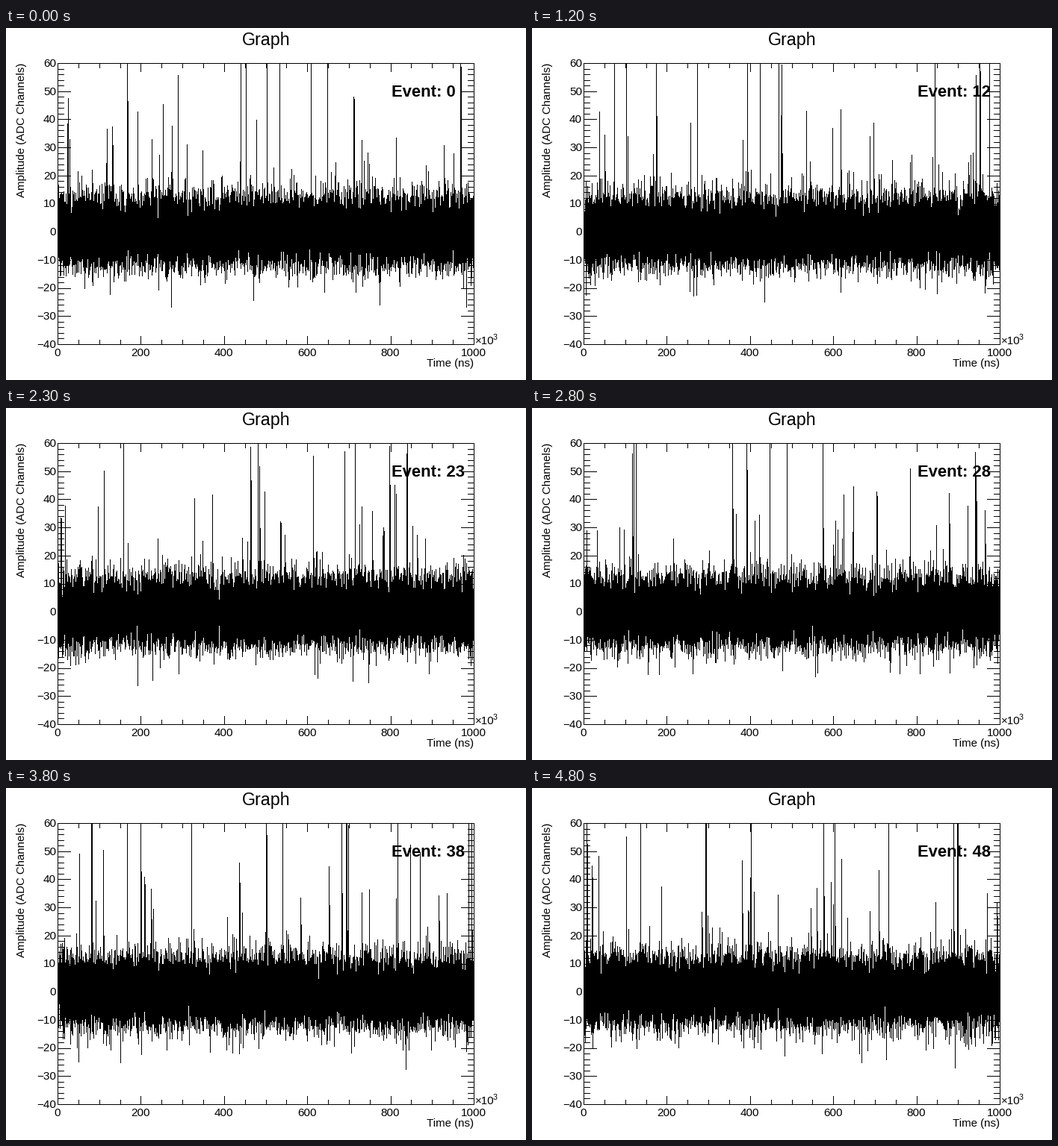
These frames come from a looping animation (696x472 px, 4900 ms). A matplotlib script:

```python
import numpy as np
import matplotlib.pyplot as plt
from matplotlib.animation import FuncAnimation
from matplotlib.collections import LineCollection

W, H, DPI = 696, 472, 100
LEFT, RIGHT, TOP, BOTTOM = 69, 626, 47, 424
EVENTS = 49
PX = 72 / DPI  # one pixel in points
COLS = np.arange(LEFT + 1, RIGHT)

plt.rcParams["font.family"] = "Liberation Sans"
fig = plt.figure(figsize=(W / DPI, H / DPI), dpi=DPI, facecolor="white")
ax = fig.add_axes([0, 0, 1, 1])
ax.set(xlim=(0, W), ylim=(H, 0))
ax.axis("off")


def x_px(t):
    return LEFT + t * (RIGHT - LEFT) / 1000


def y_px(v):
    return TOP + (60 - v) * (BOTTOM - TOP) / 100


def label(x, y, s, size=15, **kw):
    return ax.text(x, y, s, fontsize=size * PX, va="baseline", color="black", **kw)


# Whole pixels, both ends included; the small offset keeps snapping stable.
def line(x0, y0, x1, y1):
    ends = np.round([(x0, y0), (x1, y1)])
    return ends + 0.2


def hline(x0, x1, y):
    return line(x0, y, x1, y)


def vline(x, y0, y1):
    return line(x, y0, x, y1)


def line_set(segments):
    lines = LineCollection(segments, colors="black", linewidths=PX,
                           antialiaseds=False, capstyle="projecting")
    return ax.add_collection(lines, autolim=False)


def axis_lines():
    segs = [hline(LEFT, RIGHT, y) for y in (TOP, BOTTOM)]
    segs += [vline(x, TOP, BOTTOM) for x in (LEFT, RIGHT)]
    for t in range(0, 1001, 50):
        x, n = x_px(t), 11 if t % 200 == 0 else 6
        segs += [vline(x, BOTTOM - n, BOTTOM), vline(x, TOP, TOP + n)]
    for v in range(-40, 61, 2):
        y, n = y_px(v), 17 if v % 10 == 0 else 8
        segs += [hline(LEFT, LEFT + n, y), hline(RIGHT - n, RIGHT, y)]
    return segs


def trace(event):
    """Highest and lowest amplitude in each pixel column."""
    rng = np.random.default_rng(700 + event)
    n = COLS.size
    hi = 11.2 + rng.normal(0, 2.2, n) + rng.exponential(2.2, n)
    lo = -10.8 - rng.normal(0, 2, n) - rng.exponential(1.8, n)

    # Pulses, some of which spill over into the next column.
    for height in 24 + rng.exponential(26, 32):
        i = rng.integers(0, n - 1)
        hi[i] = max(hi[i], height)
        if rng.random() < 0.35:
            hi[i + 1] = max(hi[i + 1], height * rng.uniform(0.3, 1))
    lo[rng.integers(0, n, 4)] = -21 - rng.exponential(3, 4)
    return np.clip(hi, 0, 60), np.clip(lo, -40, 0)


line_set(axis_lines())
signal = line_set([])
label(348.5, 23, "Graph", 23.3, ha="center")
label(626.5, 454, "Time (ns)", ha="right")
label(25, TOP, "Amplitude (ADC Channels)", ha="right", rotation=90,
      rotation_mode="anchor")
for t in range(0, 1001, 200):
    label(x_px(t), 440, str(t), 15.3, ha="center")
for v in range(-40, 61, 10):
    label(67, y_px(v) + 4.8, str(v).replace("-", "\u2212"), 15.3, ha="right")
label(628, 424, "\u00d710")
label(652, 418, "3", 10.5)
counter = label(515.5, 91.5, "", 22, weight="bold")


def draw(event):
    hi, lo = trace(event)
    tops = np.maximum(y_px(hi), TOP + 1)
    signal.set_segments([vline(*col) for col in zip(COLS, tops, y_px(lo))])
    counter.set_text(f"Event: {event}")
    return signal, counter


anim = FuncAnimation(fig, draw, frames=EVENTS, interval=100, repeat=True)
plt.show()
```
